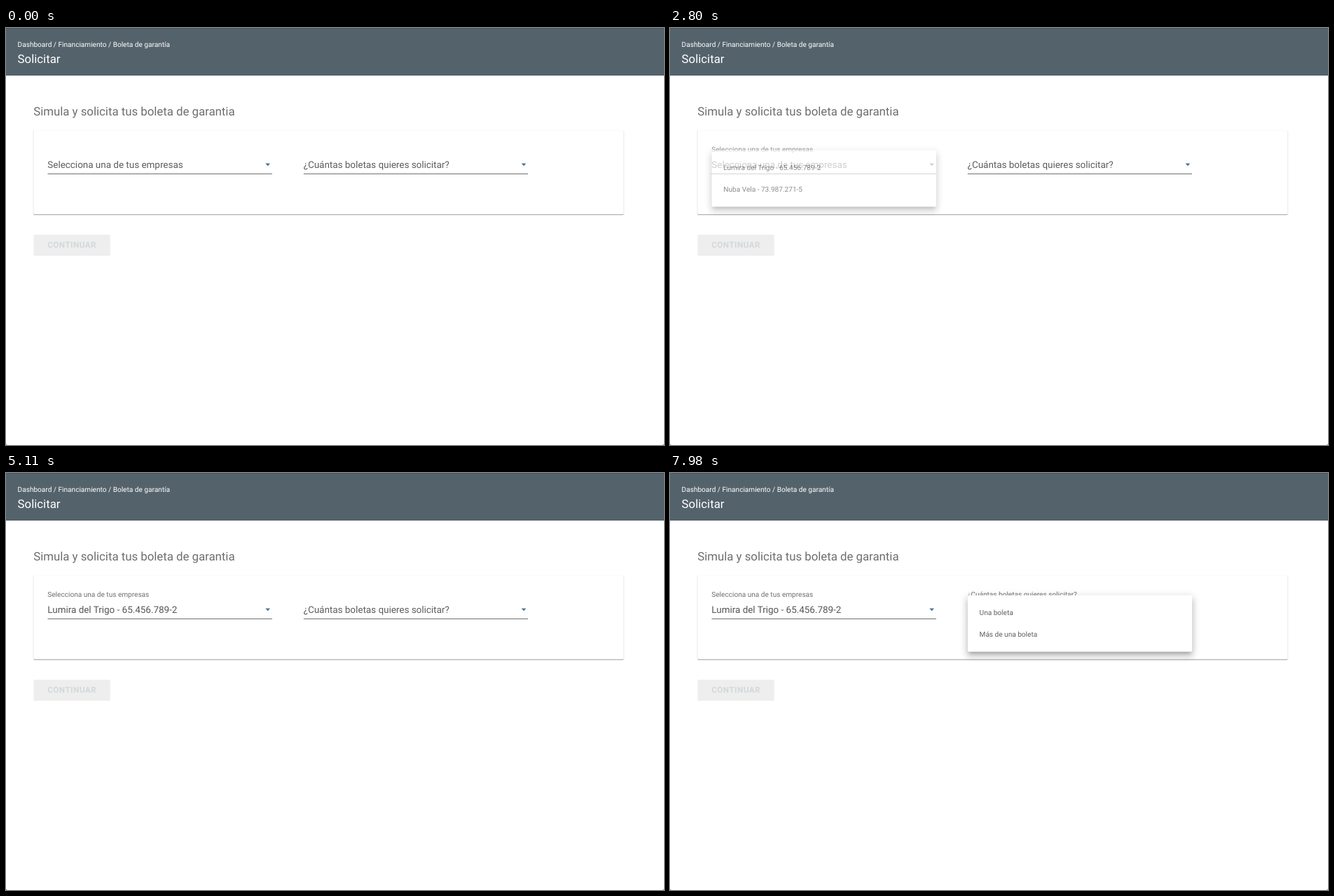
Recreate the animation shown at these times as an HTML page. Size 939x596 px, loop 8 s.

```html
<!DOCTYPE html>
<html lang="es">
<head>
<meta charset="utf-8">
<title>Solicitar</title>
<style>
  html, body { margin: 0; width: 100%; height: 100%; overflow: hidden; background: #fff; }
  svg { display: block; width: 939px; height: 596px; font-family: Roboto, sans-serif; text-rendering: geometricPrecision; }
</style>
</head>
<body>
<svg id="stage" viewBox="0 0 939 596"></svg>
<script>
const LOOP = 8000, STEP = 70;
const COMPANY = 'Lumira del Trigo - 65.456.789-2';
const SMALL = 10.08, BODY = 13.44, LARGE = 16.8;
const stage = document.getElementById('stage');

function add(parent, tag, attrs) {
  const el = document.createElementNS('http://www.w3.org/2000/svg', tag);
  for (const key in attrs) el.setAttribute(key, attrs[key]);
  return parent.appendChild(el);
}

function label(parent, x, y, size, fill, text, extra) {
  const el = add(parent, 'text', { x, y, 'font-size': size, fill, ...extra });
  el.textContent = text;
  return el;
}

function rect(parent, x, y, width, height, fill, extra) {
  return add(parent, 'rect', { x, y, width, height, fill, ...extra });
}

// Each shadow: [offset y, blur, spread, alpha]
function panel(parent, x, y, w, h, shadows) {
  for (const [dy, blur, spread, alpha] of shadows) {
    rect(parent, x - spread, y + dy - spread, w + 2 * spread, h + 2 * spread, '#000',
      { opacity: alpha, style: `filter: blur(${blur / 2}px)` });
  }
  rect(parent, x, y, w, h, '#fff', { rx: 1.7 });
}

function selectField(x, prompt, options) {
  const value = label(stage, x, 200, BODY, '#5c5c5c', prompt);
  rect(stage, x + 0.2, 208, 320.2, 1, '#707070');
  add(stage, 'path', { d: `M${x + 310.9} 193.6h6.8l-3.4 3.6z`, fill: '#526f8b' });
  const floating = label(stage, x, 177.3, SMALL, '#707070', prompt);
  const menu = add(stage, 'g', {});
  panel(menu, x + 0.2, 174.8, 320.4, 80.6, [
    [4.2, 4.2, -2.5, 0.2], [6.7, 8.4, 0.8, 0.14], [2.5, 11.8, 1.7, 0.12]
  ]);
  options.forEach((text, i) => label(menu, x + 17, 203.2 + i * 30.3, SMALL, '#606060', text));
  return { value, floating, menu };
}

rect(stage, 0, 0, 939, 596, '#fff');
rect(stage, 0, 0, 939, 68, '#54626b');
rect(stage, 0, 0, 939, 1, '#47555e');
label(stage, 16.6, 27, SMALL, '#fff', 'Dashboard / Financiamiento / Boleta de garantía');
label(stage, 16.6, 49.8, LARGE, '#fff', 'Solicitar');
label(stage, 39.2, 124.5, LARGE, '#6e6e6e', 'Simula y solicita tus boleta de garantia');
panel(stage, 39.4, 146.5, 842, 119.8, [
  [1.7, 0.84, -0.84, 0.2], [0.84, 0.84, 0, 0.14], [0.84, 2.5, 0, 0.12]
]);
rect(stage, 39.4, 295.4, 109.4, 30.2, '#eeeeee', { rx: 1.7 });
label(stage, 59.2, 314.3, 11.76, '#d3d8db', 'CONTINUAR', { 'font-weight': 700, 'letter-spacing': 0.42 });
add(stage, 'path', { d: 'M0 593.5q0 2.5 2.5 2.5h-2.5zM939 593.5q0 2.5-2.5 2.5h2.5z', fill: '#777' });

const company = selectField(59.3, 'Selecciona una de tus empresas',
  [COMPANY, 'Nuba Vela - 73.987.271-5']);
const amount = selectField(424.6, '¿Cuántas boletas quieres solicitar?',
  ['Una boleta', 'Más de una boleta']);

function ease(t, start, duration) {
  const u = Math.min(1, Math.max(0, (t - start) / duration));
  return 1 - (1 - u) ** 2;
}

function draw(t) {
  const chosen = t > 4200;
  const opened = ease(t, 2640, 350);
  const closed = ease(t, 4200, 230);
  company.value.textContent = chosen ? COMPANY : 'Selecciona una de tus empresas';
  company.value.setAttribute('fill', chosen ? '#555' : '#5c5c5c');
  company.floating.setAttribute('opacity', opened);
  company.menu.setAttribute('opacity', opened * (1 - closed));
  const shown = ease(t, 6219, 350);
  amount.floating.setAttribute('opacity', shown);
  amount.menu.setAttribute('opacity', shown);
}

function tick() {
  const t = performance.now() % LOOP;
  draw(Math.floor(t / STEP) * STEP);
  requestAnimationFrame(tick);
}
tick();
</script>
</body>
</html>
```
